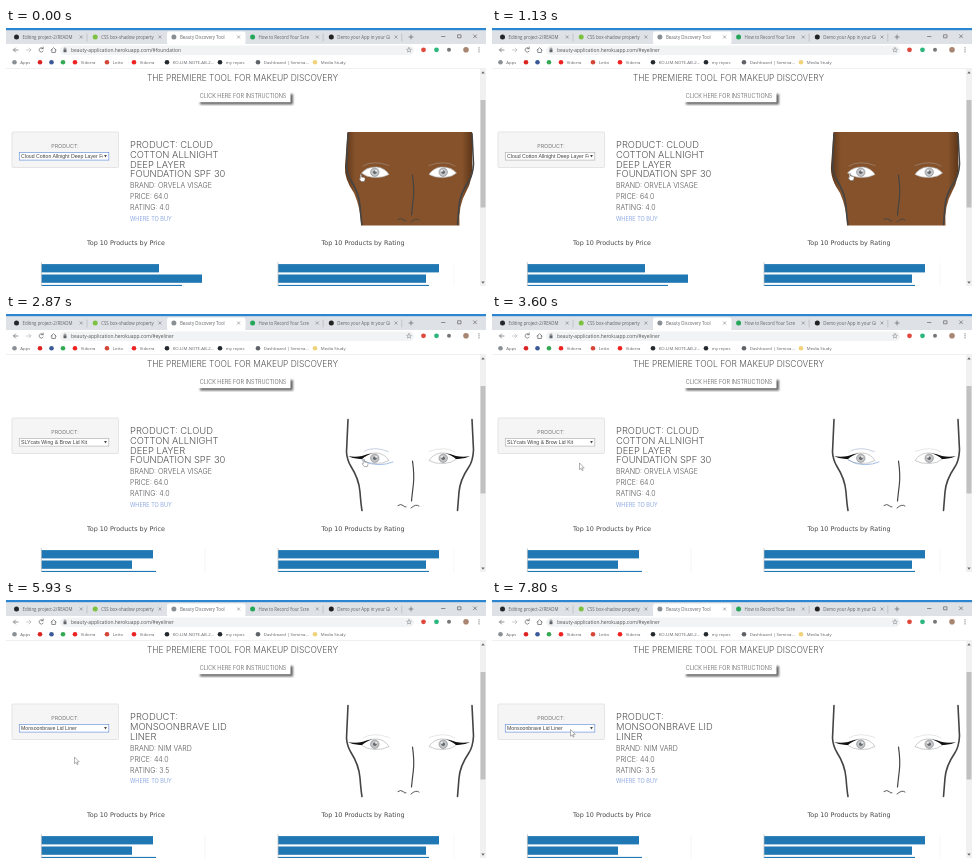
An HTML page that plays this animation: 480 px wide and 258 px high, repeating every 8 s.

```html
<!DOCTYPE html>
<html lang="en">
<head>
<meta charset="utf-8">
<style>
html, body { margin: 0; width: 100%; height: 100%; overflow: hidden; background: #fff; }
svg { display: block; width: 480px; height: 258px; }
text { white-space: pre; }
.ui { font-family: "Open Sans", sans-serif; }
.page { font-family: Inter, sans-serif; font-weight: 300; }
.form { font-family: "Liberation Sans", sans-serif; }
.chart { font-family: "DejaVu Sans", sans-serif; }
.line { fill: none; stroke-linecap: round; stroke-linejoin: round; }
</style>
</head>
<body>
<svg viewBox="0 0 480 258">
  <defs>
    <linearGradient id="skin">
      <stop offset="0" stop-color="#5c3518"/>
      <stop offset=".08" stop-color="#85522b"/>
      <stop offset=".92" stop-color="#85522b"/>
      <stop offset="1" stop-color="#5c3518"/>
    </linearGradient>
    <filter id="blur"><feGaussianBlur stdDeviation=".9"/></filter>
    <clipPath id="selectClip"><rect x="14" y="124" width="83" height="9"/></clipPath>
    <g id="eye">
      <path d="M355.5 145Q361 138.5 371 139 379 140 383 146.5 377 150 368 149.5 360 149 355.5 145Z" fill="#fff" stroke="#aaa" stroke-width=".6"/>
      <circle cx="368.8" cy="144.2" r="4.2" fill="#c2c4c6" stroke="#8c8e91" stroke-width=".7"/>
      <circle cx="368.8" cy="144.2" r="1.8" fill="#66686b"/>
      <circle cx="370" cy="142.8" r=".9" fill="#fff"/>
      <path class="line" d="M357 138Q367 131.5 383 137.5" stroke="#bbb" stroke-width=".6" opacity=".6"/>
    </g>
    <path id="wing" d="M342 142.3Q350 143.2 356 142 361 139.6 367 139.2 360 141.2 356 145 349 145.6 342 142.3Z" fill="#111"/>
  </defs>

  <g id="browser"></g>

  <g id="content">
    <g fill="#666" filter="url(#blur)"><rect x="194" y="66" width="93" height="10.5"/></g>
    <rect x="191" y="62" width="93.5" height="12.2" fill="#fff"/>
    <rect x="6" y="104" width="106.5" height="35.5" rx="1" fill="#f5f5f5" stroke="#dcdcdc" stroke-width=".7"/>
    <rect id="select" x="13.3" y="124.5" width="89.5" height="7.6" fill="#fff" stroke-width=".7"/>
    <path d="M98.1 127h2.8l-1.4 2.4z" fill="#444"/>
  </g>
  <g clip-path="url(#selectClip)"><text id="choice" class="form" x="15" y="130.2" font-size="5.2" fill="#444"></text></g>
  <g id="product"></g>

  <g id="face">
    <path id="tone" d="M341.5 104H466V130Q468 150 460 164 452 178 453.5 197.5H355Q355 181 348 165 338 151 339 138Z" fill="url(#skin)"/>
    <g class="line" stroke="#444">
      <path d="M342 105.5L340.5 138Q341 146 345 152.5 353 165 354 178T356 196.5" stroke-width="1.6"/>
      <path d="M466 105.5L467.5 136Q467 147 462.5 153.5 454 166 453 178T451.5 196.5" stroke-width="1.6"/>
      <path d="M406.5 147Q408.5 161 407.3 171T405.5 187" stroke-width="1.2"/>
      <path d="M392 191.5Q395 189.5 397 191.5T400 193M405 194Q410 189.5 413 192" stroke-width=".9"/>
    </g>
    <use href="#eye"/>
    <use href="#eye" transform="translate(806) scale(-1 1)"/>
    <g id="liner">
      <use href="#wing"/>
      <use href="#wing" transform="translate(806) scale(-1 1)"/>
    </g>
    <g id="hover" class="line" stroke="#7ba3dc" stroke-width=".7">
      <path d="M356 146Q364 151 373 150.7 381 150.5 387 148"/>
      <path d="M359 136.5Q371 132 382 138" opacity=".4"/>
    </g>
  </g>

  <g id="charts"></g>

  <g fill="#fff" stroke="#666" stroke-width=".5">
    <path id="arrow" d="M0 0V6.7L1.6 5.3 2.6 7.6 3.6 7.2 2.6 4.9H4.7Z"/>
    <path id="hand" d="M1.2.6Q2-.3 2.5.7V3L5.5 3.6Q6.3 4 6 5.3L5.3 7.6H2.2L.2 4.9Q.4 4 1.3 4.7Z"/>
  </g>
</svg>

<script>
const $ = id => document.getElementById(id);
const esc = s => s.replace(/&/g, '&amp;');
const text = (cls, x, y, size, str, fill = '#555', anchor = 'start') =>
  `<text class="${cls}" x="${x}" y="${y}" font-size="${size}" fill="${fill}" text-anchor="${anchor}">${esc(str)}</text>`;
const rect = (x, y, w, h, fill, rx = 0) =>
  `<rect x="${x}" y="${y}" width="${w}" height="${h}" fill="${fill}" rx="${rx}"/>`;
const dot = (x, y, r, fill) => `<circle cx="${x}" cy="${y}" r="${r}" fill="${fill}"/>`;
const line = (d, stroke = '#5f6368', w = .7) =>
  `<path class="line" d="${d}" stroke="${stroke}" stroke-width="${w}"/>`;

const tabs = [
  ['Editing project-2/READM', '#24292e'],
  ['CSS box-shadow property', '#7cc142'],
  ['Beauty Discovery Tool', '#8a8f94'],
  ['How to Record Your Scre', '#27a65a'],
  ['Demo your App in your Gi', '#222'],
];
const bookmarks = [
  [8.5, '#8a8f94', 'Apps'], [34, '#d22', ''], [45.5, '#3b5998', ''], [57, '#34a853', ''],
  [69, '#e22', 'Vidorra'], [101, '#d44638', 'Letto'], [128, '#e22', 'Vidorra'],
  [161, '#24292e', 'KO-LIM-NOTE-AB-2...'], [214, '#24292e', 'my repos'],
  [252, '#5f6368', 'Dashboard | Semina...'], [309, '#f0d27a', 'Media Study'],
];

function drawBrowser() {
  let s = rect(0, 0, 480, 16, '#dee1e6') + rect(0, 0, 480, 2.2, '#2b85d0') +
    rect(0, 16, 480, 25, '#fff') + rect(161, 3.5, 78.5, 13, '#fff', 2.5);
  tabs.forEach(([title, color], i) => {
    const x = 10.5 + i * 78.7;
    s += dot(x, 9, 2.5, color) + text('ui', x + 6, 10.7, 4.4, title, '#5f6368');
    s += line(`M${x + 63.5} 7.8l2.4 2.4m0-2.4l-2.4 2.4`, '#5f6368', .5);
    if (i != 1 && i != 2) s += line(`M${x + 70.5} 6v7`, '#999', .4);
  });
  s += line('M403 9h4m-2-2v4') + line('M435.5 8.5h3.5M452 6.8h3v3h-3zM467.5 6.8l3 3m0-3l-3 3', '#333', .5);
  s += line('M12 22H7.5l2-2m-2 2l2 2') + line('M20.5 22H25l-2-2m2 2l-2 2', '#b5b8bc');
  s += line('M37 20.5a2.2 2.2 0 1 0 .1 2.7M37.2 18.9V20.7H35.4') + line('M45 22.1l2.6-2.4 2.6 2.4M45.8 21.5v3h3.6v-3');
  s += rect(54, 17.5, 354, 9.6, '#f1f3f4', 4.8) + rect(57.5, 21.6, 3, 2.6, '#5f6368', .3) + line('M58.2 21.6v-1a.8.8 0 0 1 1.6 0v1');
  s += '<text id="url" class="ui" x="65" y="23.8" font-size="4.9" fill="#555"></text>';
  s += line('M403 19.6l.7 1.6 1.7.1-1.3 1.1.4 1.7-1.5-.9-1.5.9.4-1.7-1.3-1.1 1.7-.1z', '#5f6368', .4);
  s += dot(417.5, 21.8, 2.4, '#e0483e') + dot(430.5, 21.8, 2.4, '#2bb67d') + dot(443, 21.8, 2, '#777') + dot(460, 21.8, 2.8, '#a98671');
  s += [19.8, 21.8, 23.8].map(y => dot(473, y, .6, '#5f6368')).join('');
  for (const [x, color, label] of bookmarks)
    s += dot(x, 34.2, 2.3, color) + text('ui', x + 5.8, 35.8, 4.3, label, '#5f6368');
  s += line('M0 40.5H480', '#dfe1e5', .5);
  s += rect(474, 41, 6, 217, '#f1f1f1') + rect(474.5, 72, 5, 107.5, '#c1c1c1');
  s += '<path d="M475.3 45.5h3.4l-1.7-2.2zM475.3 253.5h3.4l-1.7 2.2z" fill="#666"/>';
  $('browser').innerHTML = s;
}

function drawProduct({ lines, brand, price, rating }) {
  const y = 120 + lines.length * 9.7;
  $('product').innerHTML =
    lines.map((l, i) => text('page', 124, 120 + i * 9.8, 9.4, l)).join('') +
    text('page', 124, y + 1.6, 7, 'BRAND: ' + brand) +
    text('page', 124, y + 12.6, 7, 'PRICE: ' + price) +
    text('page', 124, y + 23.5, 7, 'RATING: ' + rating) +
    text('page', 124, y + 34.3, 5.55, 'WHERE TO BUY', '#6c8fd6');
}

function drawCharts(leftEnds, grid) {
  const bars = (x, ends) => ends.map((e, i) => rect(x, 236.1 + i * 10.4, e - x, 8.3, '#1f77b4')).join('') +
    line(`M${x - .2} 234.5V258`, '#888', .4);
  $('charts').innerHTML =
    text('chart', 120, 216.5, 6.4, 'Top 10 Products by Price', '#444', 'middle') +
    text('chart', 357, 216.5, 6.4, 'Top 10 Products by Rating', '#444', 'middle') +
    (grid ? line('M199 235V258', '#eee', .6) : '') + line('M448 235V258', '#f2f2f2', .6) +
    bars(35.6, leftEnds) + bars(272.2, [433, 420, 423]);
}

const foundation = {
  lines: ['PRODUCT: CLOUD', 'COTTON ALLNIGHT', 'DEEP LAYER', 'FOUNDATION SPF 30'],
  brand: 'ORVELA VISAGE', price: '64.0', rating: '4.0',
};
const liner = {
  lines: ['PRODUCT:', 'MONSOONBRAVE LID', 'LINER'],
  brand: 'NIM VARD', price: '44.0', rating: '3.5',
};

// Pointer stops: time, x, y
const path = [
  [0, 353, 146], [70, 353, 146], [530, 355, 146], [870, 355, 146], [930, 356, 145],
  [2870, 356, 145], [3200, 258, 193], [3400, 258, 193], [3600, 87.5, 149],
  [3930, 87.5, 149], [4530, 75.5, 128.5], [5070, 75.5, 128.5], [5400, 68.5, 157],
  [6730, 68.5, 157], [7070, 88, 138], [7330, 78.5, 129.5], [8000, 78.5, 129.5],
];
function pointer(t) {
  const i = path.findIndex(p => p[0] > t);
  const [t0, x0, y0] = path[i - 1], [t1, x1, y1] = path[i];
  const k = (t - t0) / (t1 - t0), e = k * k * (3 - 2 * k);
  return [x0 + (x1 - x0) * e, y0 + (y1 - y0) * e];
}

const show = (id, on) => $(id).style.display = on ? '' : 'none';
const once = fn => { let last; return v => { if (v !== last) fn(last = v); }; };
const setProduct = once(late => drawProduct(late ? liner : foundation));
const setCharts = once(late => late ? drawCharts([147, 126, 150], true) : drawCharts([153, 196, 176], false));

function render(now) {
  const t = now % 8000;
  const step = Math.floor(t / 66.667 + .1) * 66.667;
  const [x, y] = pointer(Math.min(step, 7999));
  const overFace = x > 339;
  show('hand', overFace);
  show('arrow', !overFace);
  $(overFace ? 'hand' : 'arrow').setAttribute('transform', `translate(${x} ${y})`);

  $('url').textContent = 'beauty-application.herokuapp.com/#' + (t < 1060 ? 'foundation' : 'eyeliner');
  $('choice').textContent = t < 1195 ? 'Cloud Cotton Allnight Deep Layer Foundation'
    : t < 4730 ? 'SLYcats Wing & Brow Lid Kit' : 'Monsoonbrave Lid Liner';
  $('select').setAttribute('stroke', t < 870 || t >= 4400 ? '#6f97dd' : '#b5b5b5');
  show('tone', t < 1195);
  show('liner', t >= 1195);
  show('hover', t >= 1195 && t < 4400);
  setProduct(t >= 4730);
  setCharts(t >= 1330);
}

drawBrowser();
$('content').innerHTML +=
  text('page', 236.5, 53.2, 8.43, 'THE PREMIERE TOOL FOR MAKEUP DISCOVERY', '#555', 'middle') +
  text('page', 237, 70, 5.5, 'CLICK HERE FOR INSTRUCTIONS', '#555', 'middle') +
  text('page', 59, 120, 5.4, 'PRODUCT:', '#555', 'middle');

const start = performance.now();
function loop() {
  render(performance.now() - start);
  requestAnimationFrame(loop);
}
loop();
</script>
</body>
</html>
```
